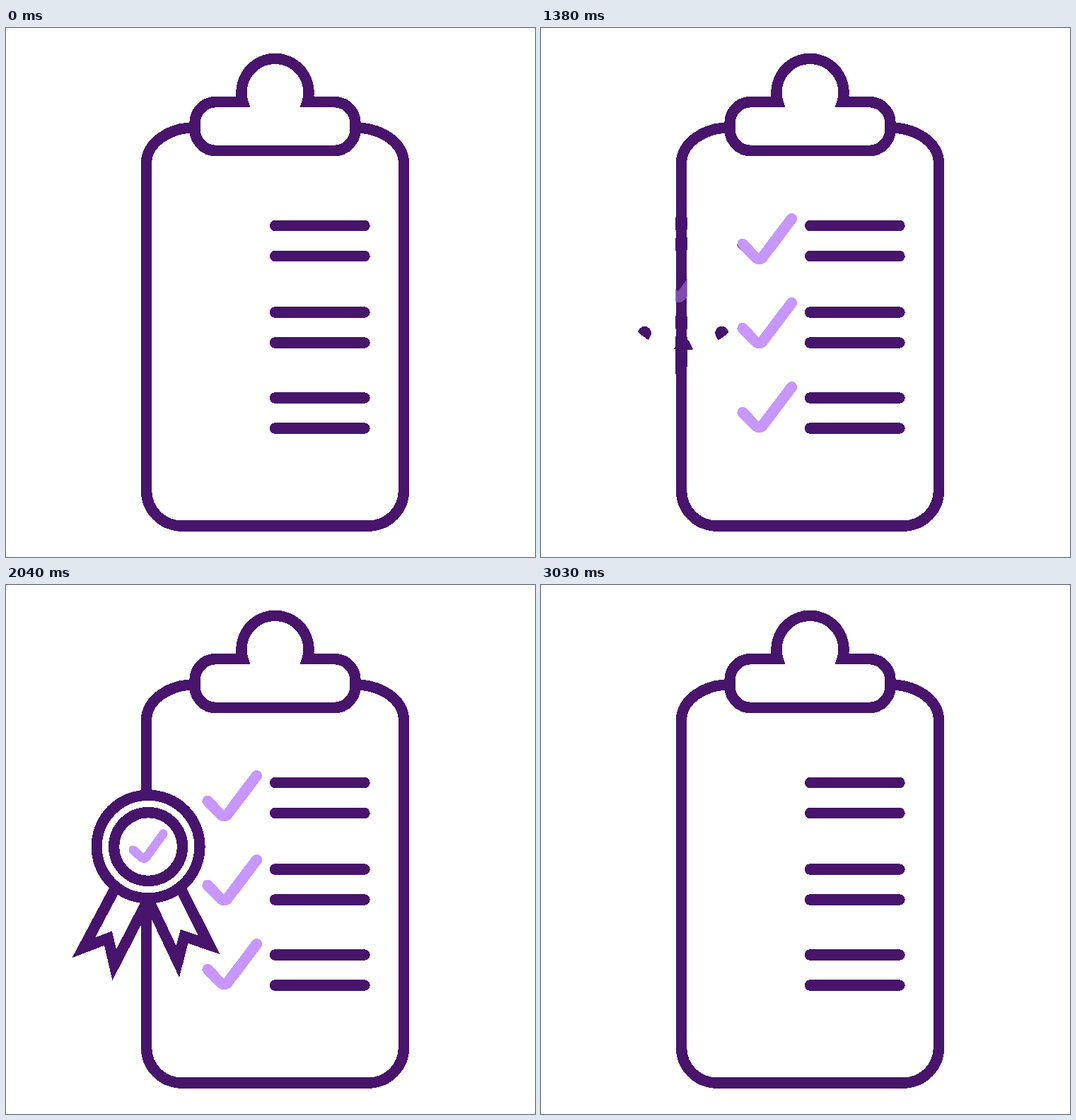
An HTML page that plays this animation: 748x748 px, repeating every 3.45 s.

```html
<!DOCTYPE html>
<html lang="en">
<head>
<meta charset="utf-8">
<title>Checklist with award badge</title>
<style>
  html, body { margin: 0; height: 100%; overflow: hidden; background: #fff; }
  svg { display: block; width: 100vw; height: 100vh; }
  .ink { fill: none; stroke: #48146c; stroke-width: 15.4; }
  .tick { fill: none; stroke: #c797ff; stroke-width: 15.4; stroke-linecap: round; }
  .round { stroke-linecap: round; }
  #badge > * { opacity: var(--alpha); }
</style>
</head>
<body>
<svg viewBox="0 0 748 748">
  <defs>
    <!-- Hard edges: every pixel is either fully there or not at all -->
    <filter id="hard" filterUnits="userSpaceOnUse" x="0" y="0" width="748" height="748" color-interpolation-filters="sRGB">
      <feComponentTransfer><feFuncA type="discrete" tableValues="0 1"/></feComponentTransfer>
    </filter>
    <mask id="gap" maskUnits="userSpaceOnUse" x="0" y="0" width="748" height="748">
      <path d="M0 0H748V748H0Z" fill="#fff"/>
      <circle id="hole" cx="201" cy="371" r="74"/>
    </mask>
    <path id="check" d="M285 305.5L303.5 324.5Q308.5 329 313.5 324L354.5 269.5" pathLength="1"/>
  </defs>
  <g filter="url(#hard)">
    <path class="ink" mask="url(#gap)" d="M266.5 141A68 50 0 0 0 198.5 191V654A50 50 0 0 0 248.5 704H512.5A50 50 0 0 0 562.5 654V191A68 50 0 0 0 494.5 141"/>
    <path class="ink" d="M335 104.5A47.5 47.5 0 1 1 426 104.5H464A30 30 0 0 1 494 134.5V143.5A30 30 0 0 1 464 173.5H297A30 30 0 0 1 267 143.5V134.5A30 30 0 0 1 297 104.5Z"/>
    <path class="ink round" d="M380.5 279.5H507M380.5 322.5H507M380.5 402H507M380.5 445H507M380.5 523H507M380.5 566H507"/>
    <g id="checks">
      <use class="tick" href="#check"/>
      <use class="tick" href="#check" y="119"/>
      <use class="tick" href="#check" y="238"/>
    </g>
    <g id="badge">
      <path class="ink round" d="M154.5 430L111.5 511L145.5 498L154 535L201 444M246.5 430L285.5 507L251 495.5L242 530.5L201 444"/>
      <circle class="ink" cx="201" cy="371" r="71.5"/>
      <circle class="ink" cx="201" cy="371" r="47.5"/>
      <path class="tick" style="stroke-width:12.5" d="M180 375.5L191.5 386Q195 389 198.5 385.5L222 353"/>
    </g>
  </g>
</svg>
<script>
  const LOOP = 3450, STEP = 30, TURN = 1800;
  const badge = document.getElementById('badge');
  const hole = document.getElementById('hole');
  const checks = [...document.getElementById('checks').children];
  const clamp = x => Math.min(1, Math.max(0, x));
  const easeInOut = x => x < .5 ? 4 * x ** 3 : 1 - 4 * (1 - x) ** 3;

  function drawChecks(t) {
    const time = t < TURN ? t : 3330 - t;
    checks.forEach((check, i) => {
      const drawn = Math.sin(clamp((time - 300 - 300 * i) / 300) * Math.PI / 2);
      check.style.visibility = drawn > 0 ? 'visible' : 'hidden';
      check.style.strokeDasharray = drawn < 1 ? `${drawn} 2` : 'none';
    });
  }

  // The badge shrinks into place while fading in, and leaves the same way
  function drawBadge(t) {
    const away = clamp(t < TURN ? 1 - (t - 1180) / 455 : (t - 1950) / 302);
    const scale = .988 + .3 * easeInOut(away);
    const transform = `translate(197.5 423.5) scale(${scale}) translate(-197.5 -423.5)`;
    badge.setAttribute('transform', transform);
    hole.setAttribute('transform', transform);
    badge.style.setProperty('--alpha', 1 - away);
    hole.style.visibility = away < .5 ? 'visible' : 'hidden';
  }

  function frame() {
    const now = performance.now() % LOOP;
    const t = now - now % STEP;
    drawChecks(t);
    drawBadge(t);
    requestAnimationFrame(frame);
  }
  frame();
</script>
</body>
</html>
```
